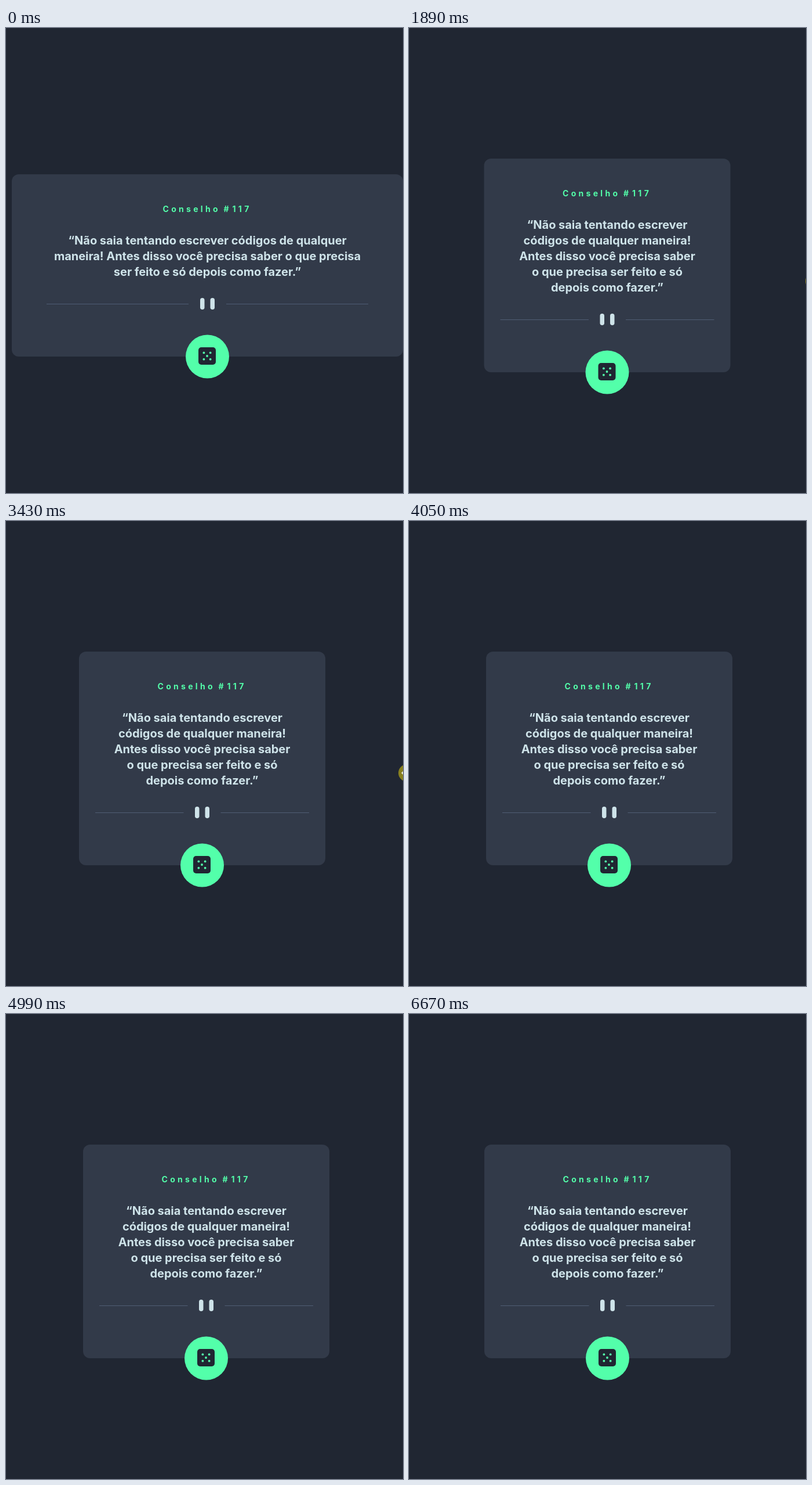
Animation of 685 by 801 pixels, one loop 7.34 s. Source, as an HTML page:

```html
<!DOCTYPE html>
<html lang="pt">
<head>
<meta charset="utf-8">
<style>
  html, body { margin: 0; width: 100%; height: 100%; overflow: hidden; background: #202632; }
  svg { display: block; }
  text { font-family: Inter, "Open Sans", sans-serif; font-weight: 700; }
  .title { font-size: 14px; letter-spacing: 4.3px; fill: #53ffaa; }
  .quote { font-size: 20px; letter-spacing: -.03px; fill: #cee3e9; text-anchor: middle; }
  .rule { fill: #4f5d74; }
  .bar { fill: #cee3e9; }
</style>
</head>
<body>
<svg id="stage" width="685" height="801" viewBox="0 0 685 801"></svg>
<script>
const LOOP = 7340;
const stage = document.getElementById('stage');

// Card drawn around x = 0; grow moves the top edge up and the bottom edge down
function card(id, half, grow, ruleStart, ruleLength, lines) {
  const top = 252 - grow, bottom = 566 + grow, ruleY = 475 + grow;
  const quote = lines.map((s, i) => `<text class="quote" y="${top + 121 + 27 * i}">${s}</text>`).join('');
  const dots = [[0, 0], [-1, -1], [1, -1], [-1, 1], [1, 1]]
    .map(([x, y]) => `<circle cx="${x * 5.625}" cy="${y * 5.625}" r="1.9" fill="#53ffaa"/>`).join('');
  return `<g id="${id}">
    <rect x="${-half}" y="${top}" width="${half * 2}" height="${bottom - top}" rx="12" fill="#323a49"/>
    <text class="title" x="-77" y="${top + 65}">Conselho <tspan x="28">#</tspan><tspan x="43">117</tspan></text>
    ${quote}
    <rect class="rule" x="${-ruleStart - ruleLength}" y="${ruleY}" width="${ruleLength}" height="1"/>
    <rect class="rule" x="${ruleStart}" y="${ruleY}" width="${ruleLength}" height="1"/>
    <rect class="bar" x="-12.5" y="${ruleY - 10}" width="7.5" height="20" rx="3.75"/>
    <rect class="bar" x="5" y="${ruleY - 10}" width="7.5" height="20" rx="3.75"/>
    <circle cy="${bottom}" r="37.5" fill="#53ffaa"/>
    <g transform="translate(-.5 ${bottom - 1})">
      <rect x="-15" y="-15" width="30" height="30" rx="5" fill="#202632"/>${dots}
    </g>
  </g>`;
}

stage.innerHTML =
  card('wide', 337.5, 0, 32.5, 245, [
    '“Não saia tentando escrever códigos de qualquer',
    'maneira! Antes disso você precisa saber o que precisa',
    'ser feito e só depois como fazer.”']) +
  card('narrow', 212.5, 27, 32, 152.5, [
    '“Não saia tentando escrever',
    'códigos de qualquer maneira!',
    'Antes disso você precisa saber',
    'o que precisa ser feito e só',
    'depois como fazer.”']) +
  `<g id="cursor">
    <circle r="15" fill="#88801f"/>
    <path id="resize" d="M-9 0H9M-6-3L-9 0L-6 3M6-3L9 0L6 3" fill="none" stroke="#e8e6d0" stroke-width="1.5"/>
    <path id="arrow" d="M0 0V13L3 10L5 15L7 14L5 9.5H9Z" fill="#fff"/>
  </g>`;

const [wide, narrow, cursor, resize, arrow] =
  ['wide', 'narrow', 'cursor', 'resize', 'arrow'].map(id => document.getElementById(id));

// Each drag of the page edge brings the centre of the page to a new place
const REST = 347.5;
const drags = [
  { start: 1560, end: 1890, to: 342 },
  { start: 2250, end: 2700, to: 333.5 },
  { start: 3160, end: 3910, to: 344.5 },
  { start: 3960, end: 4250, to: REST },
  { start: 4780, end: 5120, to: 344.5 },
  { start: 5310, end: 5320, to: 342.5 }
];
// Free pointer moves; the pointer stays until gone
const moves = [
  { start: 70, end: 480, gone: 480, from: [656, 790], to: [700, 468] },
  { start: 5980, end: 6330, gone: 6470, from: [668, 261], to: [650, 40] },
  { start: 6470, end: 6670, gone: 6670, from: [641, 145], to: [500, 830] }
];

const progress = (t, { start, end }) => Math.max(0, Math.min(1, (t - start) / (end - start)));
const easeOut = p => 1 - (1 - p) ** 1.35;
const mix = (a, b, p) => a + (b - a) * p;

function pageCenter(t) {
  const x = drags.reduce((from, drag) => mix(from, drag.to, easeOut(progress(t, drag))), REST);
  return Math.round(x * 2) / 2;
}

function freePointer(t) {
  const m = moves.find(m => t >= m.start && t < m.gone);
  if (!m) return null;
  const p = progress(t, m);
  return [mix(m.from[0], m.to[0], p * p), mix(m.from[1], m.to[1], p)];
}

const show = (el, on) => el.setAttribute('visibility', on ? 'visible' : 'hidden');
const move = (el, x, y) => el.setAttribute('transform', `translate(${x} ${y})`);

function draw(now) {
  const t = now % LOOP;
  const center = pageCenter(t);
  const isWide = center > 346;
  const free = freePointer(t);
  // Otherwise the pointer holds the page edge
  const [x, y] = free || [2 * center + 15, t < 3160 ? 436 : 434];

  move(wide, center, 0);
  move(narrow, center, 0);
  show(wide, isWide);
  show(narrow, !isWide);
  move(cursor, x, y);
  show(arrow, free);
  show(resize, !free);
  requestAnimationFrame(() => draw(performance.now() - start));
}

const start = performance.now();
draw(0);
</script>
</body>
</html>
```
